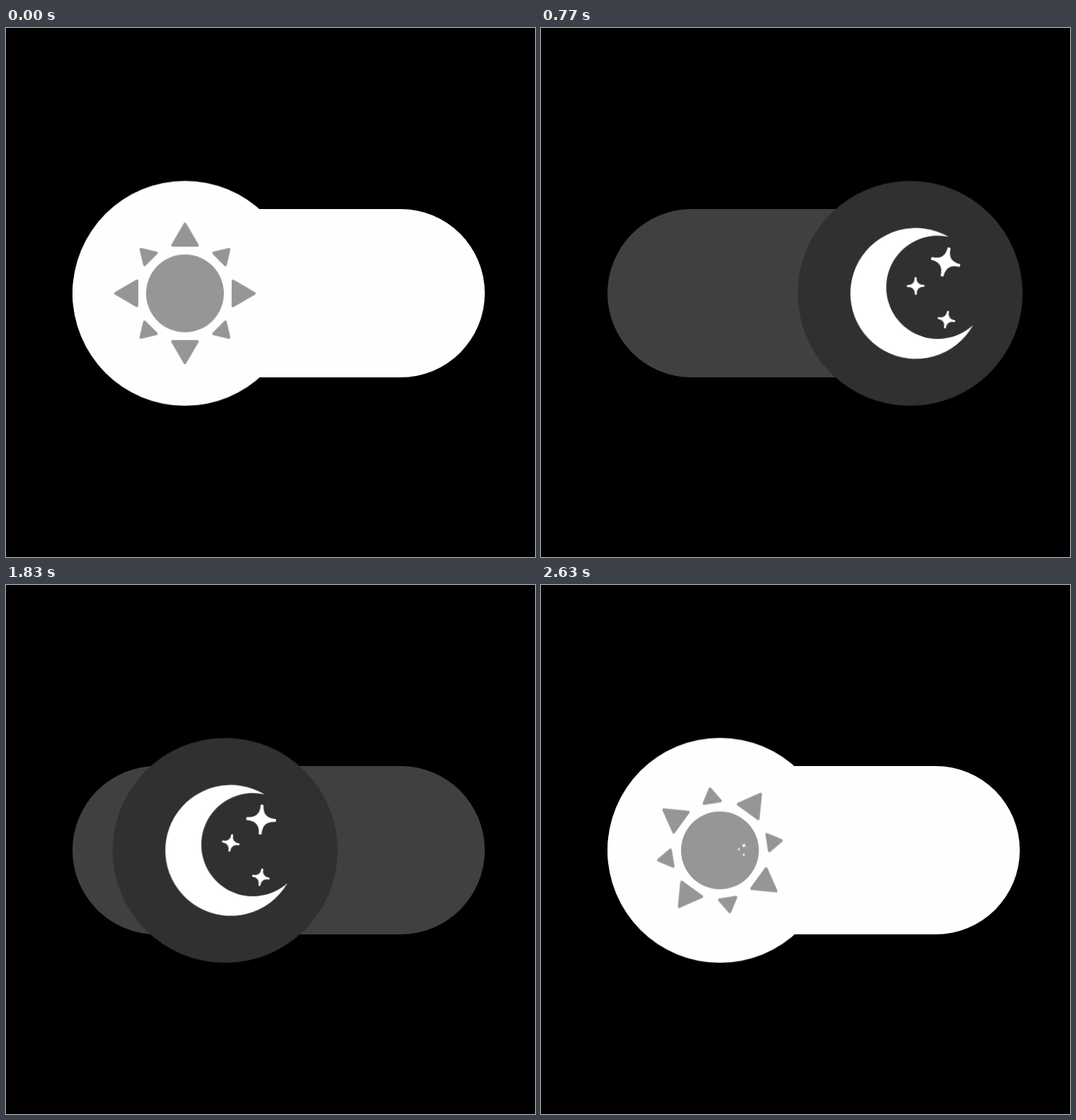
Recreate the animation shown at these times as an HTML page. Size 748 by 748 pixels, loop 2.66 s.

```html
<!DOCTYPE html>
<html lang="en">
<head>
<meta charset="utf-8">
<title>Day and night switch</title>
<style>
  html, body { margin: 0; width: 100%; height: 100%; overflow: hidden; background: #000; }
  svg { display: block; width: 100vw; height: 100vh; }

  .pill, .knob, .disc, .fade, .sun, .rays, .shift, .moon, .crescent, .star {
    animation: 2660ms linear infinite;
  }
  .pill { animation-name: pill; }
  .knob { animation-name: slide; }
  .disc { animation-name: disc; }
  .fade { animation-name: fade; }
  .sun { animation-name: sun; }
  .rays { animation-name: spin; }
  .shift { animation-name: shift; }
  .moon { animation-name: moon; }
  .crescent { animation-name: dim; }
  .star { animation-name: twirl; }

  .rays { fill: #969696; stroke: #969696; stroke-width: 4; stroke-linejoin: round; }
  .star path { fill: #fff; stroke: #fff; stroke-width: .08; stroke-linejoin: round; }

  @keyframes slide {
    0% { transform: translate(253px, 375.2px); animation-timing-function: cubic-bezier(.6, 0, .45, 1); }
    21.429%, 48.872% { transform: translate(522px, 375.2px); }
    48.872% { animation-timing-function: cubic-bezier(.36, 0, .7, .87); }
    68.797% { transform: translate(310px, 375.2px); }
    76.316% { transform: translate(276.5px, 375.2px); }
    81.391%, 100% { transform: translate(253px, 375.2px); }
  }
  @keyframes pill {
    0%, 16.729% { fill: #fdfffe; }
    26.128%, 70.677% { fill: #404040; }
    80.075%, 100% { fill: #fdfffe; }
  }
  @keyframes disc {
    0%, 12.594% { fill: #fefefe; }
    20.113%, 73.684% { fill: #303030; }
    81.579%, 100% { fill: #fefefe; }
  }
  @keyframes fade {
    0%, 12.594% { opacity: 1; }
    20.113%, 76.316% { opacity: 0; }
    81.579%, 100% { opacity: 1; }
  }
  @keyframes sun {
    0%, 12.594% { transform: scale(1); }
    20.113% { transform: scale(.62); }
    76.316% { transform: scale(.3); }
    81.579%, 100% { transform: scale(1); }
  }
  @keyframes spin {
    0% { transform: rotate(0deg); }
    20.113% { transform: rotate(21.4deg); }
    76.316% { transform: rotate(-2.4deg); }
    100% { transform: rotate(-56.6deg); }
  }
  @keyframes shift {
    0%, 18.797% { transform: translateX(7px); }
    25.564%, 68.797% { transform: translateX(8.5px); }
    76.316% { transform: translateX(7.5px); }
    81.391%, 100% { transform: translateX(27px); }
  }
  @keyframes moon {
    0%, 16.165% { transform: rotate(-.6deg) scale(0); }
    25.564% { transform: rotate(-1deg) scale(1); }
    43.985% { transform: rotate(-1.9deg) scale(1); }
    69.925% { transform: rotate(0deg) scale(1); }
    79.323%, 100% { transform: rotate(1.2deg) scale(.16); }
  }
  @keyframes dim {
    0%, 69.925% { opacity: 1; }
    77.82%, 100% { opacity: 0; }
  }
  @keyframes twirl {
    0% { transform: rotate(var(--from)); }
    80.075%, 100% { transform: rotate(var(--to)); }
  }
</style>
</head>
<body>
<svg viewBox="0 0 748 748">
  <defs>
    <path id="big" d="M0-98L17.5-68H-17.5Z"/>
    <path id="small" d="M0-88L11.8-69H-11.8Z"/>
    <g id="pair">
      <use href="#big"/>
      <use href="#small" transform="rotate(45)"/>
    </g>
    <path id="spark" d="M.06-.96Q.06-.06 .96-.06V.06Q.06 .06 .06 .96H-.06Q-.06 .06-.96 .06V-.06Q-.06-.06-.06-.96Z"/>
  </defs>

  <rect class="pill" x="94" y="256" width="583" height="238" rx="119"/>

  <g class="knob">
    <circle class="disc" r="159"/>

    <g class="fade">
      <g class="sun">
        <circle r="55" fill="#969696"/>
        <g class="rays">
          <use href="#pair"/>
          <use href="#pair" transform="rotate(90)"/>
          <use href="#pair" transform="rotate(180)"/>
          <use href="#pair" transform="rotate(270)"/>
        </g>
      </g>
    </g>

    <g class="shift">
      <g class="moon">
        <path class="crescent" fill="#fff" d="M47.5-79A92.5 92.5 0 1 0 79.5 46.5A73 73 0 1 1 47.5-79Z"/>
        <g transform="translate(42.5 -43.5) scale(21)">
          <g class="star" style="--from:-41.6deg;--to:116deg"><path d="M.06-.96Q.06-.06 .96-.06V.06Q.06 .06 .06 .96H-.06Q-.06 .06-.96 .06V-.06Q-.06-.06-.06-.96Z"/></g>
        </g>
        <g transform="translate(-.5 -10.5) scale(12.5)">
          <g class="star" style="--from:-7deg;--to:13deg"><path d="M.06-.96Q.06-.06 .96-.06V.06Q.06 .06 .06 .96H-.06Q-.06 .06-.96 .06V-.06Q-.06-.06-.06-.96Z"/></g>
        </g>
        <g transform="translate(42 38) scale(12.5)">
          <g class="star" style="--from:-52deg;--to:125deg"><path d="M.06-.96Q.06-.06 .96-.06V.06Q.06 .06 .06 .96H-.06Q-.06 .06-.96 .06V-.06Q-.06-.06-.06-.96Z"/></g>
        </g>
      </g>
    </g>
  </g>
</svg>
</body>
</html>
```
